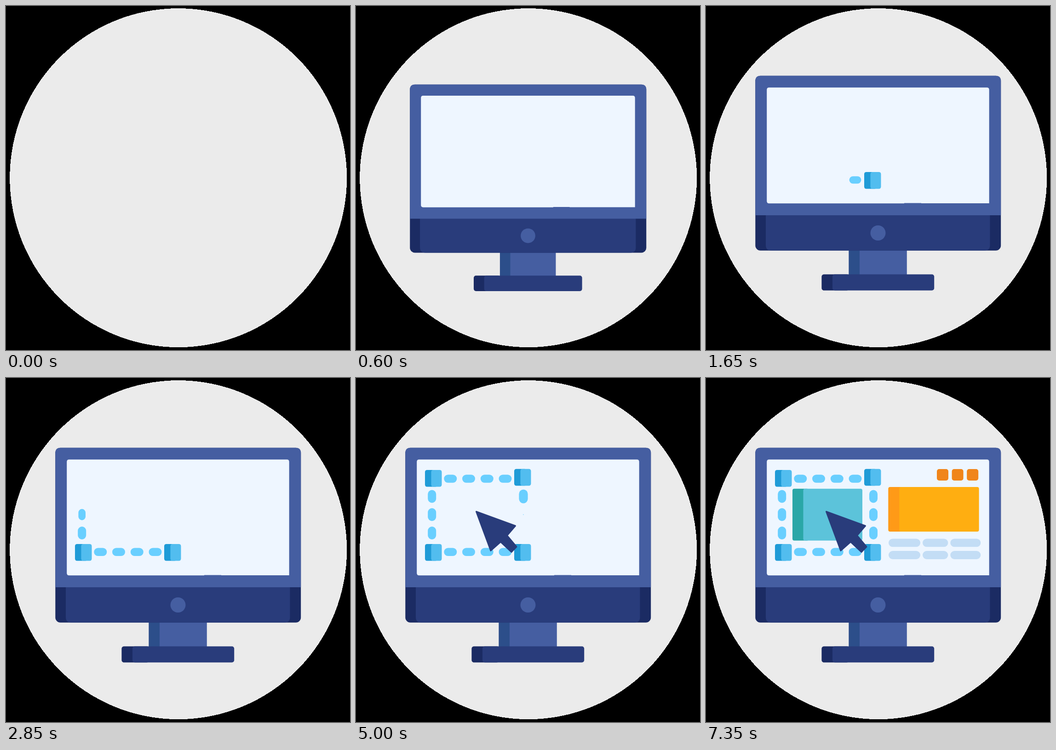
Animation, 748 px wide and 748 px high, one loop 7750 ms. Source, as an HTML page:

```html
<!DOCTYPE html>
<html lang="en">
<head>
<meta charset="utf-8">
<title>Screen layout</title>
<style>
  html, body { margin: 0; width: 100%; height: 100%; overflow: hidden; background: #000; }
  svg { display: block; width: 100vw; height: 100vh; }
</style>
</head>
<body>
<svg id="stage" viewBox="0 0 748 748">
  <defs>
    <clipPath id="disc"><ellipse cx="374.7" cy="373.6" rx="366.5" ry="368.5"/></clipPath>
  </defs>
  <ellipse cx="374.7" cy="373.6" rx="366.5" ry="368.5" fill="#ebebeb" shape-rendering="crispEdges"/>
  <g clip-path="url(#disc)">
    <g id="monitor">
      <path d="M310.6 530H436.8V585H310.6Z" fill="#455ea1"/>
      <path d="M310.6 530H334V585H310.6Z" fill="#2c4e8a"/>
      <rect x="251.4" y="583.5" width="60" height="35" rx="5" fill="#1b2b63"/>
      <rect x="275" y="583.5" width="221.2" height="35" rx="5" fill="#293c7b"/>
      <rect x="107.3" y="151.8" width="533.9" height="380" rx="11" fill="#1b2b63"/>
      <path d="M130 450H617.5V520Q617.5 531.8 605.5 531.8H142Q130 531.8 130 520Z" fill="#293c7b"/>
      <path d="M107.3 455V162.8Q107.3 151.8 118.3 151.8H630.2Q641.2 151.8 641.2 162.8V455Z" fill="#455ea1"/>
      <path d="M132.2 182.2Q132.2 177.2 137.2 177.2H610.7Q615.7 177.2 615.7 182.2V429H468V428.4H431V429.2H137.2Q132.2 429.2 132.2 424.2Z" fill="#eef6ff"/>
      <circle cx="374" cy="493.5" r="16.5" fill="#455ea1"/>
    </g>
    <g id="parts"></g>
    <path id="cursor" fill="#293c7b" stroke="#293c7b" stroke-width="3" stroke-linejoin="round"
      d="M261.5 290.5L346.5 321.5L328.5 342.5L349 367L338 378.5L314.5 356.5L293 375.5Z"/>
  </g>
</svg>
<script>
const LOOP = 7750, STEP = 50;
const $ = id => document.getElementById(id);
const parts = [];

const progress = (t, start, dur) => Math.min(1, Math.max(0, (t - start) / dur));
const easeOut = power => p => 1 - (1 - p) ** power;
const easeIn = p => p * p;
const backOut = p => 1 + 2.70158 * (p - 1) ** 3 + 1.70158 * (p - 1) ** 2;
const elasticOut = p => p <= 0 ? 0 : p >= 1 ? 1
  : 1 + 2 ** (-10 * p) * Math.sin((p - 0.075) * 2 * Math.PI / 0.3);

function box(x, y, w, h, r, fill) {
  const el = document.createElementNS('http://www.w3.org/2000/svg', 'rect');
  const attrs = { x, y, width: w, height: h, rx: r, fill };
  for (const k in attrs) el.setAttribute(k, attrs[k]);
  return el;
}

// A part scales in around its centre, or around its right edge when wide is set.
function addPart(start, dur, ease, shapes, x, y, w, h, wide) {
  const el = document.createElementNS('http://www.w3.org/2000/svg', 'g');
  el.append(...shapes);
  $('parts').append(el);
  parts.push({ el, start, dur, ease, wide, cx: wide ? x + w : x + w / 2, cy: y + h / 2 });
}

// Card with a darker strip along its left side.
function addCard(start, dur, ease, x, y, w, h, strip, r, dark, light) {
  addPart(start, dur, ease, [
    box(x, y, strip + 3 * r, h, r, dark),
    box(x + strip, y, w - strip, h, r, light)
  ], x, y, w, h);
}

const addHandle = (start, x, y) =>
  addCard(start, 360, elasticOut, x, y, 36.5, 36.5, 13.5, 4.5, '#1f9bd7', '#52bdef');

function addDash(start, cx, cy, upright) {
  const w = upright ? 18 : 28, h = upright ? 28 : 17.5;
  const x = cx - w / 2, y = cy - h / 2;
  addPart(start, 210, backOut, [box(x, y, w, h, Math.min(w, h) / 2, '#69cfff')], x, y, w, h);
}

const columns = [205.3, 245, 284.8, 324.5];
const rows = [257.5, 297, 337];

addHandle(1245, 344, 361);
columns.forEach((x, i) => addDash(1585 + (3 - i) * 150, x, 378.3));
addHandle(2185, 150, 361);
rows.forEach((y, i) => addDash(2542 + (2 - i) * 250, 165.2, y, true));
addHandle(3295, 150, 200);
columns.forEach((x, i) => addDash(3645 + i * 148, x, 219));
addHandle(4240, 344, 197.7);
rows.forEach((y, i) => addDash(4845 + i * 152, 364, y, true));

addCard(5340, 400, easeOut(3), 188, 240.7, 152, 112.8, 23.5, 4, '#2aa7a7', '#5cc3da');

const bars = [[397, 69], [471, 55.3], [531.3, 66]];
const barTimes = [
  [[5640, 310], [5780, 320], [5900, 310]],
  [[5740, 660], [6000, 500], [6070, 430]]
];
barTimes.forEach((line, row) => line.forEach(([start, dur], i) => {
  const [x, w] = bars[i], y = 349.5 + row * 26.6;
  addPart(start, dur, easeIn, [box(x, y, w, 17.8, 8.9, '#c3ddf5')], x, y, w, 17.8, true);
}));

addCard(6187, 313, easeOut(3), 396.3, 237, 197.3, 97, 24, 4, '#ff9a17', '#ffae11');

[0, 1, 2].forEach(i => {
  const x = 502 + i * 32.6;
  addPart(6575 + i * 245, 285, easeOut(3), [box(x, 198, 25, 25, 5, '#f0851a')], x, 198, 25, 25);
});

function show(el, on, transform) {
  el.setAttribute('visibility', on ? 'visible' : 'hidden');
  el.setAttribute('transform', transform);
}

const scaleAt = (cx, cy, sx, sy) =>
  `translate(${cx} ${cy}) scale(${sx} ${sy}) translate(${-cx} ${-cy})`;

function draw(t) {
  const m = progress(t, 200, 850);
  const scale = 1 - 0.475 * (1 - m) ** 4;
  show($('monitor'), t >= 200,
    `translate(0 ${460 * (1 - m) ** 6}) ` + scaleAt(374.2, 385, scale, scale));

  for (const p of parts) {
    const s = p.ease(progress(t, p.start, p.dur));
    show(p.el, s > 0, scaleAt(p.cx, p.cy, s, p.wide ? 1 : s));
  }

  const away = (1 - progress(t, 4330, 570)) ** 3;
  show($('cursor'), t > 4330, `translate(${330 * away} ${365 * away})`);
}

const origin = performance.now();
function tick() {
  const t = (performance.now() - origin) % LOOP;
  draw(Math.floor(t / STEP) * STEP);
  requestAnimationFrame(tick);
}
tick();
</script>
</body>
</html>
```
